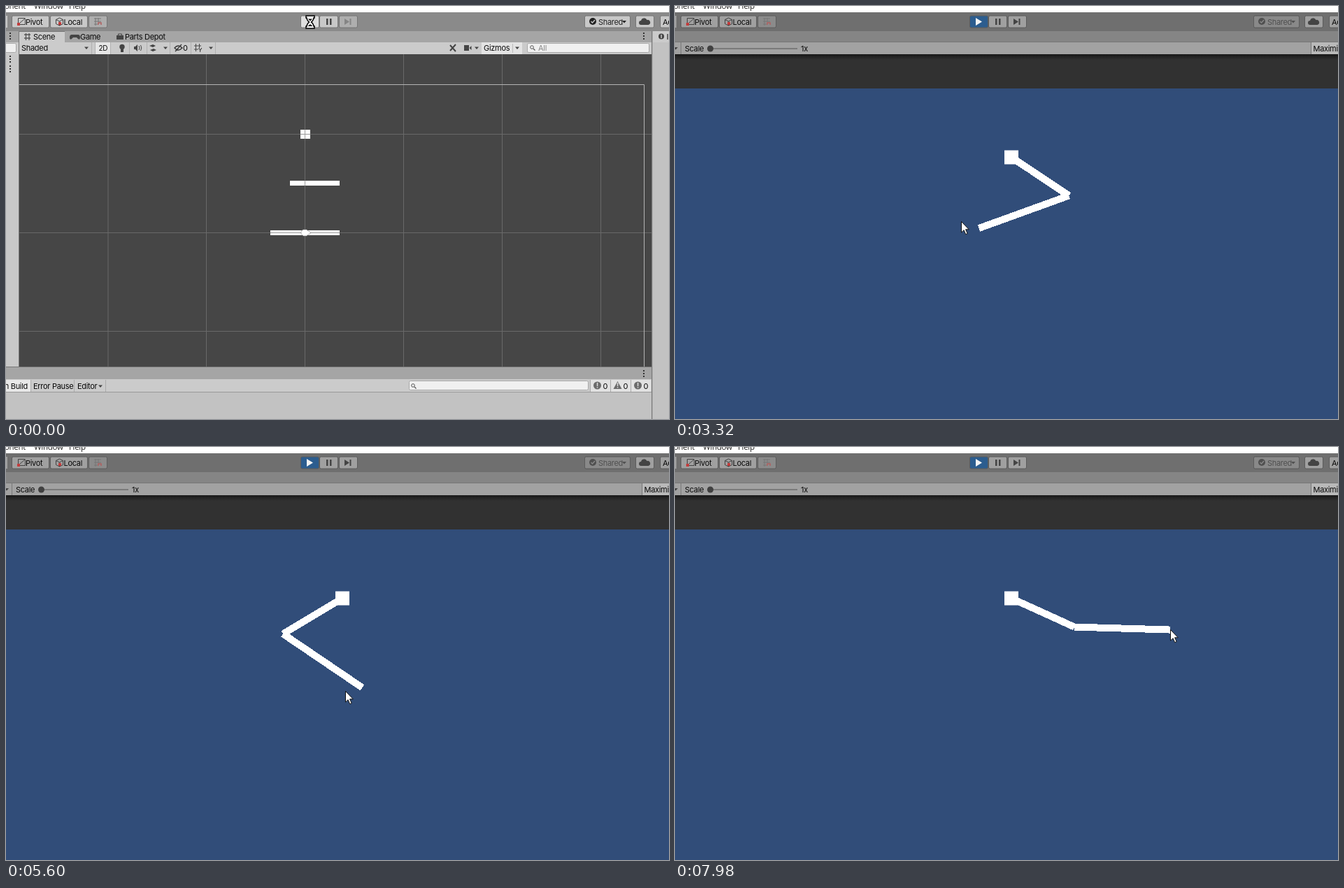
An HTML page that plays this animation: 948 by 591 pixels, repeating every 8 s.

```html
<!DOCTYPE html>
<html lang="en">
<head>
<meta charset="utf-8">
<title>Two-bone arm following the pointer</title>
<style>
html, body { margin: 0; width: 100%; height: 100%; overflow: hidden; background: #c2c2c2; }
svg { display: block; width: 948px; height: 591px; }
text { font: 11px Inter, sans-serif; letter-spacing: -.3px; fill: #090909; white-space: pre; }
.menu text { font: 11.5px "Open Sans", sans-serif; fill: #222; }
.arm line { stroke: #fff; stroke-width: 10; shape-rendering: crispEdges; }
</style>
</head>
<body>
<svg id="stage" viewBox="0 0 948 591">
  <defs>
    <linearGradient id="shade" x2="0" y2="1">
      <stop stop-color="#181818"/><stop offset="1" stop-color="#313131"/>
    </linearGradient>
  </defs>
</svg>
<script>
const stage = document.getElementById('stage');
const rect = (x, y, w, h, fill, extra = '') =>
  `<rect x="${x}" y="${y}" width="${w}" height="${h}" fill="${fill}" ${extra}/>`;
const text = (x, y, s, extra = '') => `<text x="${x}" y="${y}" ${extra}>${s}</text>`;
const path = (d, fill = '#444', extra = '') => `<path d="${d}" fill="${fill}" ${extra}/>`;
const stroke = (d, color = '#444', w = 1) => path(d, 'none', `stroke="${color}" stroke-width="${w}"`);
const down = (x, y) => path(`M${x - 3} ${y - 1.5}h6l-3 3.5z`);
const dots = (x, y, c = '#333') => [-4, 0, 4].map(d => rect(x - 1, y + d - 1, 2, 2, c)).join('');
const lens = (x, y) => `<circle cx="${x}" cy="${y}" r="2.3" fill="none" stroke="#555"/>` +
  stroke(`M${x + 2} ${y + 2}l2.5 2.5`, '#555', 1.3);
const field = (x, y, w) => rect(x + .5, y + .5, w, 13, '#f0f0f0', 'rx="2" stroke="#a8a8a8"');

const cloud = path('M908 27a3 3 0 0 1 0-6a4.5 4.5 0 0 1 8.5-1a3.6 3.6 0 0 1 2 7z');

function menu() {
  return rect(0, 0, 948, 9, '#fff') + '<g class="menu">' +
    text(28, 4, 'Component', 'text-anchor="end"') + text(40, 4, 'Window') +
    text(90, 4, 'Help') + '</g>';
}

function toolbar(playing) {
  const bg = playing ? '#6f6f6f' : '#8a8a8a', face = playing ? '#a0a0a0' : '#c8c8c8';
  const edge = playing ? '#5c5c5c' : '#747474', dim = playing ? '#8b8b8b' : '#aeaeae';
  const button = (x, w, fill = face) => rect(x + .5, 14, w - 1, 17, fill, `rx="2" stroke="${edge}"`);
  const share = (fill, ink) => button(827, 66, fill) +
    `<circle cx="839" cy="22" r="5" fill="${ink}"/>` + stroke('M836.5 22l2 2l3.5-4', fill, 1.4) +
    text(847, 26.5, 'Shared', `style="fill:${ink}"`) +
    path('M881 21h6l-3 3.5z', ink);
  return rect(0, 9, 948, 27, bg) +
    rect(-4, 14, 6, 17, face) + button(8, 54) + button(63, 54) + button(118, 27, dim) +
    stroke('M17.5 26.5v-9h10M17.5 26.5h10v-8M19 25l8-7') + path('M16 24h4v4h-4z', '#c33c3c') +
    text(28, 26.5, 'Pivot') +
    stroke('M71.5 19.5l5-2.5l5 2.5v6l-5 2.5l-5-2.5zM71.5 19.5l5 2.5l5-2.5M76.5 22v6') +
    path('M75 23h4v4h-4z', '#c33c3c') + text(82.5, 26.5, 'Local') +
    stroke('M126 18h10M126 22h10M126 26h5M128 17v11M132 17v6', '#777') +
    stroke('M132 27v-3h4v3', '#b06060', 1.5) +
    button(421, 27, playing ? '#2c5d8f' : '#dedede') +
    (playing ? path('M430 17l9 5.5l-9 5.5z', '#f4f4f4') : '') +
    button(448, 27) + path('M458 18h2.5v9h-2.5zM463 18h2.5v9h-2.5z') +
    button(476, 27, playing ? face : dim) +
    path('M484 18l7 4.5l-7 4.5zM491.5 18h2v9h-2z', playing ? '#444' : '#858585') +
    share(face, playing ? '#333' : '#222') +
    (playing ? `<g id="shareOff">${share('#898989', '#505050')}</g>` : '') +
    button(900, 27) + cloud + button(935, 40) + text(939, 26.5, 'Account');
}

function editor() {
  const light = '#cbcbcb', row = '#a5a5a5';
  const gridX = [146, 286.5, 427.5, 568.5, 709.5, 850.5].map(x => `M${x} 69V516`).join('');
  const gridY = [183.5, 324.5, 465.5].map(y => `M19 ${y}H923`).join('');
  const badge = (x, d) => path(d, '#6b6b6b') + rect(x - .7, 539, 1.5, 5, '#ddd') +
    rect(x - .7, 545, 1.5, 1.5, '#ddd') + text(x + 8, 547.5, '0');
  const disc = x => `M${x - 5.5} 543a5.5 5.5 0 1 1 11 0a5.5 5.5 0 1 1-11 0z`;
  return toolbar(false) +
    rect(0, 36, 948, 16, row) + rect(0, 52, 948, 17, light) + rect(0, 69, 18, 448, '#c8c8c8') +
    field(-9, 53, 23) + dots(6, 43) + dots(6, 76) + dots(6, 90) +
    rect(18, 36, 66, 16, light) + stroke('M18 36.5H84', '#777') +
    stroke('M26 41h9M26 46h9M28.5 39v10M33 39v10', '#555', 1.3) + text(39, 48, 'Scene') +
    path('M94 41h9q3 0 3 4q0 4-3 2l-2-2h-5l-2 2q-3 2-3-2q0-4 3-4z') + text(106, 48, 'Game') +
    path('M158 42h10v6h-10z') + stroke('M160.5 42v-2h5v2') + text(170, 48, 'Parts Depot') +
    dots(912, 43) +
    text(22, 64, 'Shaded') + down(115, 60) + rect(127, 52, 22, 17, '#e6e6e6') +
    text(132.5, 64, '2D', 'style="font-size:10px"') +
    stroke([122.5, 127.5, 149.5, 176.5, 201.5, 234.5, 264.5, 299.5].map(x => `M${x} 52v17`).join(''), '#b0b0b0') +
    '<circle cx="166" cy="58.5" r="3.7" fill="#444"/>' + rect(164, 62, 4, 4, '#444') +
    path('M183 58h2l3-3v10l-3-3h-2z') + stroke('M190 57q2 3 0 6M192.5 56q2.5 4 0 8') +
    path('M205 57l5-2l4 2l-4 2zM206 63l5-2l4 2l-5 2z') + down(228, 60) +
    stroke('M241 60q5-6 11 0q-6 6-11 0zM242 65l9-10', '#333', 1.3) + text(253, 64, '0') +
    stroke('M269 57h10M269 62h6M271.5 54v11M276.5 54v6') + text(275, 66, 'Y', 'style="font-size:8px"') +
    down(293, 60) +
    stroke('M635 56l8 9M643 55l-8 9', '#444', 2) +
    path('M655 56h7v8h-7zM662.5 60l3-3v6z') + down(673, 60) +
    rect(680, 52, 58, 17, '#e4e4e4') + text(683, 64, 'Gizmos') + stroke('M724.5 54v13', '#bbb') + down(731, 60) +
    field(745, 53, 174) + lens(752, 59) + text(761, 64, 'All', 'style="fill:#888"') +
    rect(19, 69, 904, 448, '#464646') + stroke(gridX + gridY, '#696969') +
    stroke('M19 112.5H912.5V516', '#b4b4b4') +
    rect(421, 177, 14, 13, '#fff') + rect(406, 250, 71, 7, '#fff') + rect(378, 321, 99, 7, '#fff') +
    stroke('M427.5 177v13M421 183.5h14M427.5 250v7M378 324.5h99', '#999') +
    path('M422 322l3-2h5l2 2l3 1v3l-3 1l-2 2h-5l-3-3z', '#fff', 'stroke="#888" stroke-width=".6"') +
    rect(18, 36, 1, 481, '#777') + rect(923, 36, 1.5, 555, '#777') +
    rect(924.5, 36, 24, 16, light) + rect(924.5, 52, 24, 539, '#c2c2c2') +
    '<circle cx="937" cy="43.5" r="4" fill="#444"/>' + rect(936.4, 41, 1.3, 5, '#ddd') + text(944.5, 48, 'Info') +
    rect(0, 516, 923, 1, '#777') + rect(0, 517, 923, 17, row) + dots(912, 526) +
    rect(0, 534, 923, 18, light) + rect(0, 552, 923, 39, '#c2c2c2') + stroke('M0 552.5H923', '#999') +
    rect(0, 535, 35, 17, '#e8e8e8') +
    text(31, 547.5, 'Clear on Build', 'text-anchor="end"') + text(39, 547.5, 'Error Pause') + text(102, 547.5, 'Editor') +
    down(135, 544) + stroke([35.5, 97.5, 142.5, 835.5, 864.5, 893.5].map(x => `M${x} 535v17`).join(''), '#aaa') +
    field(576, 536, 256) + lens(582, 543) +
    [836, 865, 894].map(x => rect(x, 535, 28, 17, '#e2e2e2')).join('') +
    badge(845.5, disc(845.5)) + badge(874.5, 'M874.5 537l6 11h-12z') + badge(903.5, disc(903.5));
}

function game() {
  return toolbar(true) +
    rect(0, 36, 948, 16, '#858585') + rect(0, 52, 948, 17, '#a2a2a2') + stroke('M0 51.5H948M8.5 52v17', '#777') +
    path('M-2 59h6l-3 3.5z') + text(14, 64.5, 'Scale') + rect(50, 60.5, 125, 1, '#555') +
    '<circle cx="50.5" cy="61" r="4.5" fill="#404040"/>' + text(180, 64.5, '1x') +
    rect(910, 52, 38, 17, '#b9b9b9') + stroke('M909.5 52v17', '#777') + text(912.5, 64.5, 'Maximize On Play') +
    rect(0, 69, 948, 522, '#313131') + rect(0, 69, 948, 8, 'url(#shade)') +
    '<g id="view">' + rect(0, 118, 948, 473, '#314d79') + rect(471, 206.5, 20, 20, '#fff') +
    '<g class="arm"><line id="upper"/><line id="lower"/></g></g>';
}

stage.innerHTML += menu() + `<g id="edit">${editor()}</g><g id="play">${game()}</g>` +
  '<g id="busy">' + path('M429 14h12v3h-1q0 3-3.5 6q3.5 3 3.5 6h1v3h-12v-3h1q0-3 3.5-6q-3.5-3-3.5-6h-1z', '#fff', 'stroke="#000" stroke-width="1.5"') +
  path('M432 18.5h6l-3 3zM431.5 29l3.5-3l3.5 3z', '#000') + '</g>' +
  path('M.5.5V16l3.6-3.3l2.6 6l2.5-1.1l-2.6-5.8h4.7z', '#fff', 'id="arrow" stroke="#111"');

// Pointer path: time, x, y
const keys = [
  [100, 434, 20], [440, 476, 144], [640, 476, 144], [820, 488, 159], [1280, 488, 159],
  [2080, 506, 184], [2140, 506, 184], [2440, 506, 190], [2480, 506, 190],
  [2620, 470, 166], [2760, 400, 185], [2900, 378, 255], [3010, 450, 318], [3120, 525, 312],
  [3320, 409, 308], [3440, 379, 285], [3600, 450, 321], [3740, 522, 314], [3840, 492, 330],
  [4040, 348, 258], [4200, 412, 172], [4230, 434, 156], [4290, 475, 166], [4350, 517, 178],
  [4430, 572, 215], [4500, 605, 265], [4570, 592, 328], [4760, 480, 326], [5000, 322, 276],
  [5200, 460, 325], [5380, 622, 262], [5480, 585, 322], [5600, 485, 349], [5670, 446, 345],
  [5880, 464, 347], [6040, 464, 347], [6240, 520, 360], [6440, 630, 334], [6580, 682, 285],
  [6720, 650, 320], [6860, 672, 260], [7020, 688, 228], [7100, 669, 286], [7180, 650, 319],
  [7420, 704, 268], [7660, 690, 312], [7860, 711, 272], [7980, 708, 261]
];

const slope = (i, k) => (keys[i + 1][k] - keys[i][k]) / (keys[i + 1][0] - keys[i][0]);
function tangent(i, k) {
  if (!i || i === keys.length - 1) return 0;
  const a = slope(i - 1, k), b = slope(i, k);
  return a * b <= 0 ? 0 : 2 * a * b / (a + b);
}
function pointer(t) {
  t = Math.min(Math.max(t, keys[0][0]), 7980);
  let i = 0;
  while (i < keys.length - 2 && t >= keys[i + 1][0]) i++;
  const span = keys[i + 1][0] - keys[i][0], u = (t - keys[i][0]) / span;
  return [1, 2].map(k => {
    const a = keys[i][k], b = keys[i + 1][k];
    return a + (b - a) * u * u * (3 - 2 * u) +
      span * u * (1 - u) * ((1 - u) * tangent(i, k) - u * tangent(i + 1, k));
  });
}

// Each step aims the lower bone at the pointer, then drags the upper bone along.
const STEP = 20, START = 2480, LOOP = 8000, LAG = 25, UPPER = 99, LOWER = 137, base = [481, 216.5];
const reach = (p, a, len) => [p[0] + len * Math.cos(a), p[1] + len * Math.sin(a)];
const aim = (p, q) => Math.atan2(q[1] - p[1], q[0] - p[0]);
const poses = [];
let elbow = reach(base, Math.PI / 2, UPPER);
for (let t = START; t < LOOP; t += STEP) {
  const goal = pointer(t - LAG), low = aim(elbow, goal);
  elbow = reach(base, aim(base, reach(goal, low, -LOWER)), UPPER);
  poses.push([base, elbow, reach(elbow, low, LOWER)]);
}

const $ = id => document.getElementById(id);
const show = (id, on) => { $(id).style.display = on ? '' : 'none'; };
function bone(id, p, q) {
  [['x1', p[0]], ['y1', p[1]], ['x2', q[0]], ['y2', q[1]]].forEach(([k, v]) => $(id).setAttribute(k, v));
}

const begin = performance.now();
function draw() {
  const t = Math.floor((performance.now() - begin) % LOOP / STEP) * STEP;
  const playing = t >= 100, live = t >= 2140;
  show('edit', !playing);
  show('busy', !playing);
  show('play', playing);
  show('arrow', playing);
  show('view', live);
  show('shareOff', live);
  $('arrow').setAttribute('transform', `translate(${pointer(t).map(Math.round)})`);
  if (t < START) {
    bone('upper', [481, 266], [481, 364.5]);
    bone('lower', [486.5, 370], [501.5, 233]);
  } else {
    const [a, b, c] = poses[(t - START) / STEP];
    bone('upper', a, b);
    bone('lower', b, c);
  }
  requestAnimationFrame(draw);
}
draw();
</script>
</body>
</html>
```
